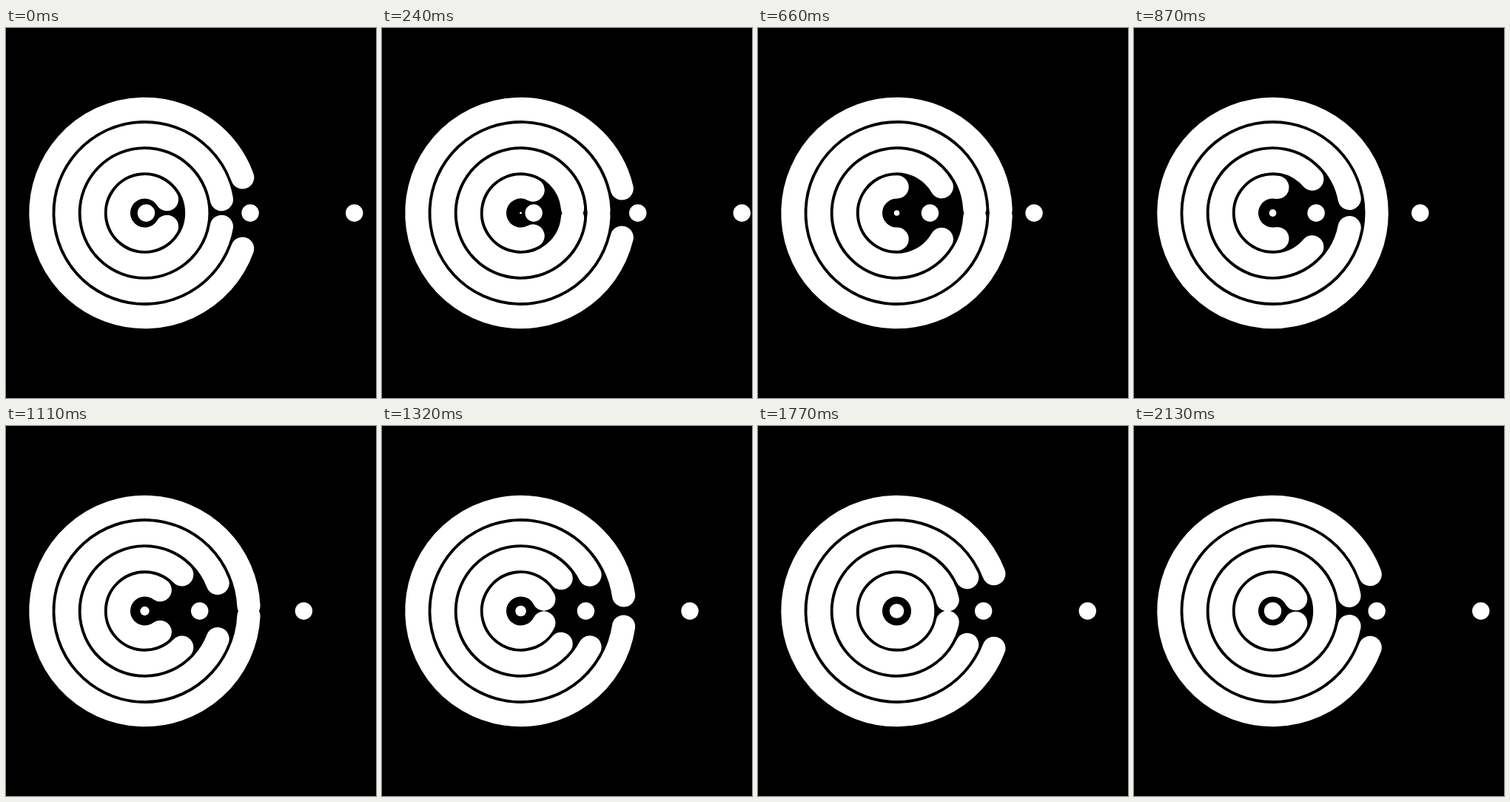
These frames come from a looping animation (500 px wide and 500 px high, 2160 ms). An HTML page with a canvas:

```html
<!DOCTYPE html>
<html lang="en">
<head>
<meta charset="utf-8">
<title>Rings</title>
<style>
html, body { margin: 0; width: 100%; height: 100%; overflow: hidden; background: #000; }
canvas { display: block; width: 500px; height: 500px; }
</style>
</head>
<body>
<canvas id="stage"></canvas>
<script>
const SIZE = 500, STEP = 30, STEPS = 72, TAU = Math.PI * 2;
const U = SIZE / 128;           // layout unit
const CX = 48 * U, CY = 64 * U;
const GAP = 9 * U;              // distance between ring centre lines
const BALL = 3 * U;
const RINGS = 4;

const canvas = document.getElementById('stage');
const ctx = canvas.getContext('2d');
const dpr = window.devicePixelRatio || 1;
canvas.width = canvas.height = SIZE * dpr;
ctx.scale(dpr, dpr);
ctx.lineWidth = 8 * U;
ctx.lineCap = 'round';

function ball(x, r) {
  ctx.beginPath();
  ctx.arc(x, CY, r, 0, TAU);
  ctx.fill();
}

// Each mouth opens and shuts by the same arc length, one after another.
function ring(k, p) {
  const r = k * GAP;
  const open = 7 * U * (1 + Math.cos(TAU * (p - 1 / 9 - k / 5)));
  const a = open / r;
  ctx.beginPath();
  ctx.arc(CX, CY, r, a, TAU - a);
  ctx.stroke();
}

function draw(p) {
  ctx.fillStyle = '#000';
  ctx.fillRect(0, 0, SIZE, SIZE);
  ctx.fillStyle = ctx.strokeStyle = '#fff';
  for (let k = 1; k <= RINGS; k++) ring(k, p);
  ball(CX, BALL * p);
  for (let n = 0; n < 3; n++) ball(CX + RINGS * GAP * (p + n), BALL);
}

function tick() {
  const step = Math.floor(performance.now() / STEP + 1e-6) % STEPS;
  draw((step + 1) / STEPS);
  requestAnimationFrame(tick);
}
tick();
</script>
</body>
</html>
```
